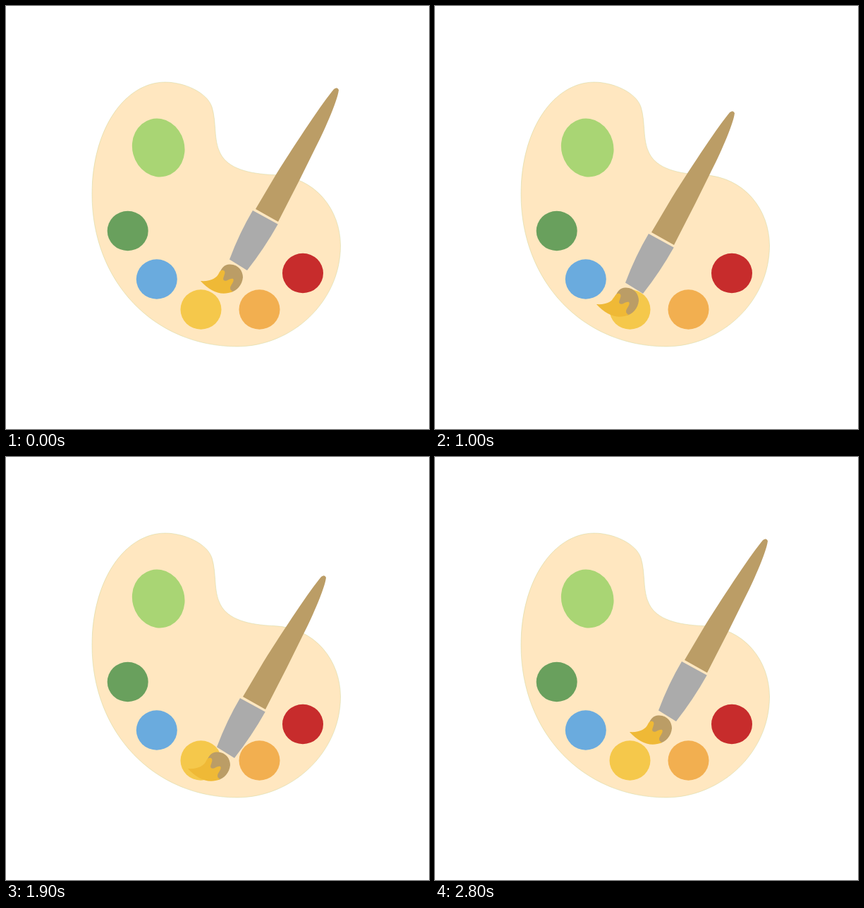
Write an HTML page that moves like this. It is 600 px wide and 600 px high and loops after 2.9 s.

```html
<!DOCTYPE html>
<html lang="en">
<head>
<meta charset="utf-8">
<title>Palette and brush</title>
<style>
  html, body { margin: 0; width: 100%; height: 100%; overflow: hidden; background: #fff; }
  svg { display: block; width: 100vw; height: 100vh; }
  #paints ellipse { rx: 29px; ry: 28.2px; }
</style>
</head>
<body>
<svg viewBox="0 0 600 600">
  <path fill="#ffe7c0" stroke="#c6cf8c" stroke-width=".4" d="M226 108C252 108 285 122 292 143C299 165 294 190 304 209C315 231 345 238 380 239.5C440 242 474.5 290 474.5 340C474.5 420 405 483 328 483C210 483 122 391 122 267C122 174 169 108 226 108Z"/>
  <ellipse cx="216.2" cy="201" rx="37" ry="41.7" fill="#a9d574" transform="rotate(-15 216.2 201)"/>
  <g id="paints">
    <ellipse cx="172.7" cy="319" fill="#69a05d"/>
    <ellipse cx="213.8" cy="387.5" fill="#6aabde"/>
    <ellipse cx="276.5" cy="430.5" fill="#f5c84b"/>
    <ellipse cx="359.5" cy="430.5" fill="#f2af50"/>
    <ellipse cx="421" cy="379" fill="#c72c2c"/>
  </g>
  <g id="brush">
    <path fill="#bb9d66" d="M354 288L383 239C414 190 449 137 465 118Q470 114 472 119C470 136 449 182 438 203L416 247.5L386 306Z"/>
    <path fill="#ababab" d="M350 290L385.7 309.5Q367 343 342 375L317 359.5Q331 322 350 290Z"/>
    <path fill="#bb9d66" d="M303 379C306 371 310 366 318 366.5C330 367 336 376 336 385C335 396 327 404 319 406L305 395Z"/>
    <path fill="#efb936" d="M276 390C290 391 299 386 302 379C304 374 308 374 310 376C312 380 306 387 309 389C312 392 318 385 322 387C325 390 318 396 318 400C318 403 320 404 322 405C305 412 290 405 276 390Z"/>
  </g>
</svg>
<script>
  const STEP = 100, STEPS = 29;
  const START = 1, DIP = 7, SECOND = 19, LIFT = 25, END = 28;
  const home = [0, 0], lift = [-32, 17];

  const mix = (a, b, k) => a.map((v, i) => v + (b[i] - v) * k);

  // Stirring ellipse, clockwise from the bottom.
  const orbit = degrees => {
    const a = degrees * Math.PI / 180;
    return [-28 - 20 * Math.sin(a), 37.5 + 16.5 * Math.cos(a)];
  };

  // The first turn slows down, the second is quicker and even.
  const stir = step => step <= SECOND
    ? orbit(10 + 320 * ((step - DIP) / (SECOND - DIP)) ** 0.88)
    : orbit(330 + 35.7 * (step - SECOND));

  const offset = step => {
    if (step <= START || step >= END) return home;
    if (step < DIP) return mix(home, stir(DIP), (step - START) / (DIP - START));
    if (step < LIFT) return stir(step);
    return mix(lift, home, (step - LIFT) / (END - LIFT));
  };

  const frames = Array.from({ length: STEPS + 1 }, (_, step) => {
    const [x, y] = offset(step).map(Math.round);
    return { transform: `translate(${x}px, ${y}px)`, easing: 'step-end' };
  });
  document.getElementById('brush').animate(frames, {
    duration: STEPS * STEP,
    iterations: Infinity
  });
</script>
</body>
</html>
```
